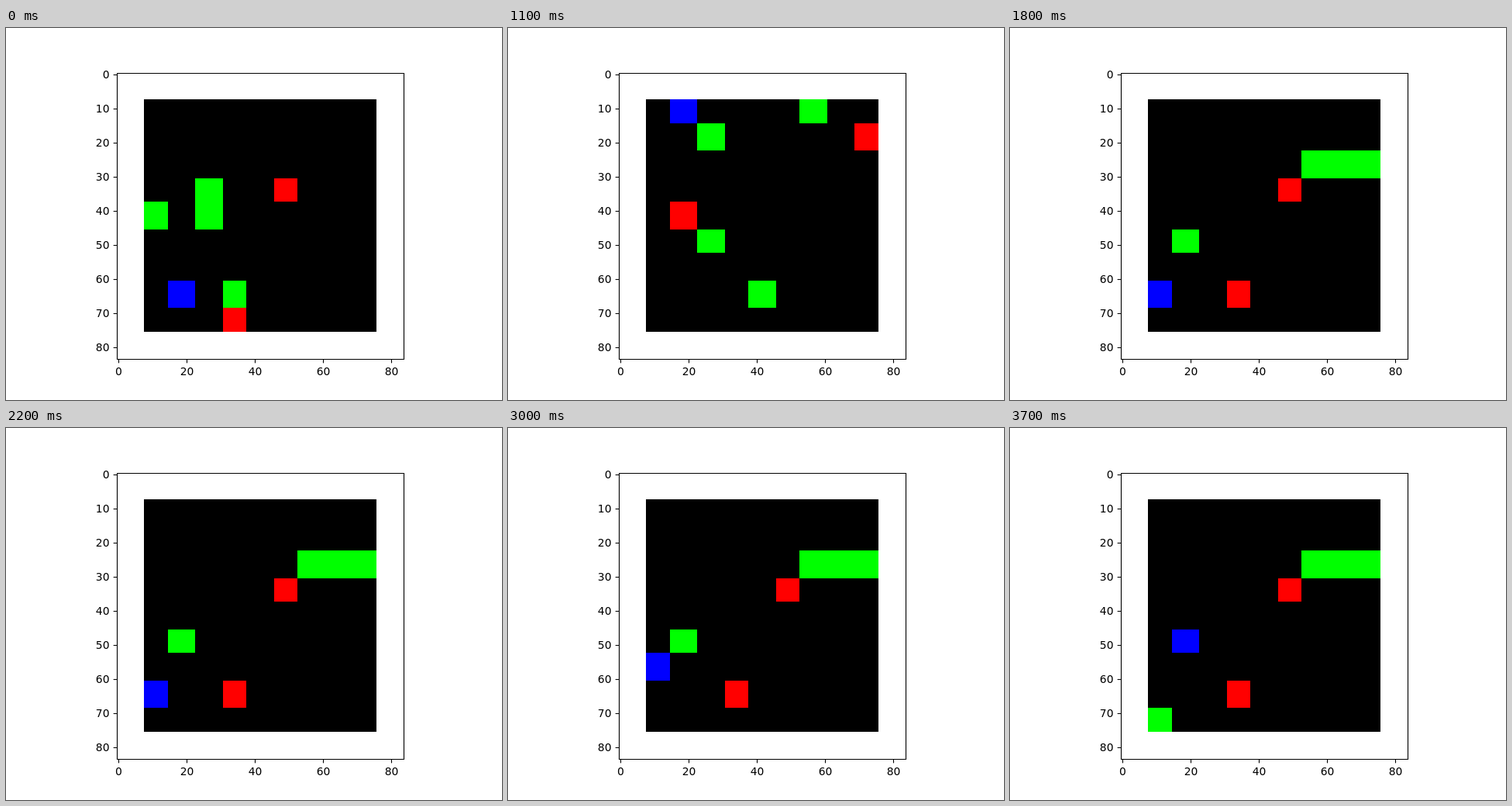
Write an HTML page that moves like this. It is 640 px wide and 480 px high and loops after 3.8 s.

```html
<!DOCTYPE html>
<html lang="en">
<head>
<meta charset="utf-8">
<title>Grid world</title>
<style>
html, body { margin: 0; width: 100%; height: 100%; overflow: hidden; background: #fff; }
svg { display: block; width: 640px; height: 480px; }
text { font: 13.889px "DejaVu Sans", sans-serif; fill: #000; }
#axes path { stroke: #000; stroke-width: 1.11; fill: none; }
</style>
</head>
<body>
<svg viewBox="0 0 640 480">
  <rect x="178" y="92" width="300" height="300"/>
  <g id="cells" shape-rendering="crispEdges"></g>
  <g id="axes"><path d="M143.5 58.5H513.5V427.5H143.5Z"/></g>
</svg>
<script>
const NS = "http://www.w3.org/2000/svg";
const LOOP = 3800, STEP = 100;
const edges = [178, 209, 244, 280, 310, 346, 376, 412, 447, 478];
const axes = document.getElementById("axes");
const cells = document.getElementById("cells");

function add(parent, tag, attrs, text) {
  const el = document.createElementNS(NS, tag);
  for (const key in attrs) el.setAttribute(key, attrs[key]);
  if (text !== undefined) el.textContent = text;
  parent.appendChild(el);
}

for (let v = 0; v <= 80; v += 10) {
  const y = 60.5 + 4.4 * v;
  add(axes, "path", { d: `M143.5 ${y}h-4.86` });
  add(axes, "text", { x: 133.5, y: y + 4.5, "text-anchor": "end" }, v);
  if (v % 20) continue;
  const x = 145.5 + 4.4 * v;
  add(axes, "path", { d: `M${x} 427.5v4.86` });
  add(axes, "text", { x, y: 448, "text-anchor": "middle" }, v);
}

// Cells are "column row" digit pairs; each path holds one cell per step.
const rounds = [
  { food: "23 24 04 37", foes: "53 38", path: "17 27 37" },
  { food: "21 60 25 47", foes: "81 14", respawn: "43",
    path: "11 01 01 11 10 00 00 00 10 11 10 11 21" },
  { food: "62 72 82 15", foes: "53 37", respawn: "08",
    path: "16 06 07 17 18 08 07 08 07 07 08 18 17 07 06 05 06 16 06 06 05 15" }
];

const steps = rounds.flatMap(({ food, foes, respawn, path }) => {
  let left = food.split(" ");
  return path.split(" ").map(player => {
    if (left.includes(player)) {
      left = left.filter(c => c !== player);
      if (respawn) left.push(respawn);
    }
    return { player, food: left, foes: foes.split(" ") };
  });
});

function fillCell(cell, fill) {
  const [c, r] = [...cell].map(Number);
  add(cells, "rect", {
    x: edges[c], y: edges[r] - 86,
    width: edges[c + 1] - edges[c], height: edges[r + 1] - edges[r], fill
  });
}

let shown = -1;
function draw() {
  const i = Math.floor(performance.now() % LOOP / STEP);
  if (i !== shown) {
    shown = i;
    cells.replaceChildren();
    const { food, foes, player } = steps[i];
    food.forEach(c => fillCell(c, "#0f0"));
    foes.forEach(c => fillCell(c, "#f00"));
    fillCell(player, "#00f");
  }
  requestAnimationFrame(draw);
}
draw();
</script>
</body>
</html>
```
